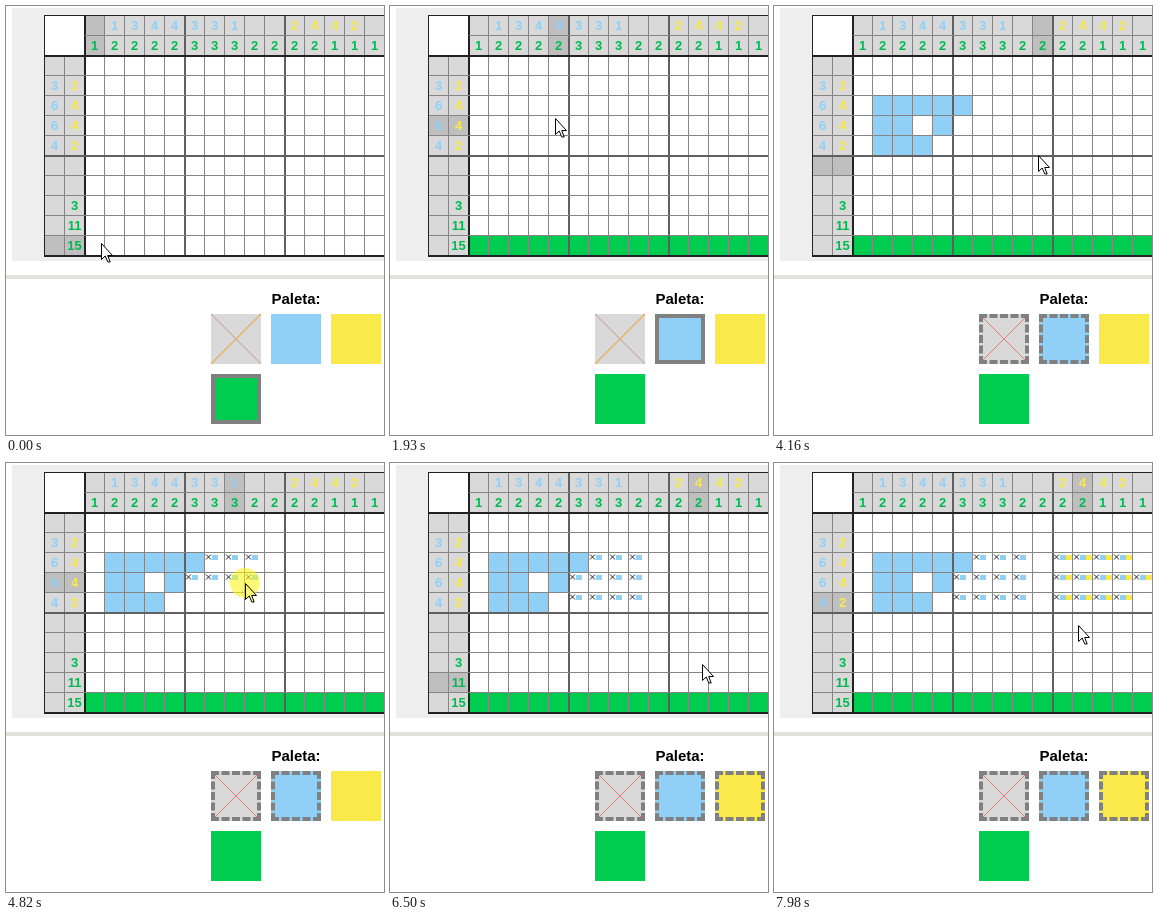
These frames come from a looping animation (378 px wide and 429 px high, 8 s). An HTML page with a canvas:

```html
<!DOCTYPE html>
<html lang="es">
<head>
<meta charset="utf-8">
<title>Nonograma</title>
<style>
  html, body { margin: 0; width: 100%; height: 100%; overflow: hidden; background: #fff; }
  canvas { display: block; width: 378px; height: 429px; }
</style>
</head>
<body>
<canvas id="stage" width="378" height="429"></canvas>
<script>
const ctx = document.getElementById('stage').getContext('2d');
const LOOP = 8000, LEFT = 79, TOP = 50, CELL = 20, COLS = 15, ROWS = 10;
const HOVER_LAG = 60;
const BLUE = '#90d0f7', YELLOW = '#f9e94a', GREEN = '#00cc50', CLUE_GREEN = '#00ba50';
const GREY = '#d9d9d9', DARK = '#bfbfbf';

// Clues: colour letter (b, y, g) followed by the number.
const colClues = [
  ' b1 b3 b4 b4 b3 b3 b1   y2 y4 y4 y2 '.split(' '),
  [...'122223332222111'].map(n => 'g' + n)
];
const rowClues = [
  ' b3 b6 b6 b4'.split(' '),
  ' y2 y4 y4 y2   g3 g11 g15'.split(' ')
];
const clueColours = { b: BLUE, y: YELLOW, g: CLUE_GREEN };

// Drawing strokes run at constant speed through cell centres (column, row).
function stroke(from, to, corners) {
  const points = corners.map(([col, row]) => [LEFT + 10 + col * CELL, TOP + 10 + row * CELL]);
  const reach = [0];
  points.slice(1).forEach(([x, y], i) =>
    reach.push(reach[i] + Math.hypot(x - points[i][0], y - points[i][1])));
  return points.map(([x, y], i) => [from + (to - from) * reach[i] / reach.at(-1), x, y]);
}

const blueStroke = stroke(2180, 2940,
  [[1, 2], [1, 4], [3, 4], [4, 3], [4, 2], [5, 2], [1, 2], [2, 3]]);
const crossStroke = stroke(4300, 5340,
  [[8, 2], [6, 2], [5, 3], [8, 3], [8, 4], [5, 4], [6, 3]]);
const yellowStroke = stroke(6690, 7560,
  [[10, 2], [10, 4], [11, 4], [11, 2], [12, 2], [12, 4], [13, 4], [13, 2], [13, 3], [14, 3]]);

// Other pointer moves: time, then x and y of the tip.
const travel = [
  [0, 95, 237], [50, 95, 237], [920, 370, 237], [960, 370, 237],
  [1350, 290, 330], [1510, 288, 328], [1720, 243, 210], [1850, 176, 130], [1930, 165, 112],
  [3000, 132, 115], [3060, 132, 117], [3720, 246, 331], [3920, 246, 331],
  [4060, 263, 178], [4160, 264, 149],
  [5410, 214, 118], [5500, 214, 118], [5700, 250, 180], [6000, 345, 332], [6190, 345, 332],
  [6320, 342, 310], [6420, 317, 235], [6500, 312, 201],
  [7620, 366, 120], [7880, 320, 135], [LOOP, 301, 167]
];
const path = [...travel, ...blueStroke, ...crossStroke, ...yellowStroke]
  .sort((a, b) => a[0] - b[0]);

const presses = [
  { from: 50, to: 950, brush: [GREEN] },
  { from: 1400, to: 1490 },
  { from: 2180, to: 3050, brush: [BLUE] },
  { from: 3885, to: 3930 },
  { from: 4300, to: 5470, brush: ['x', BLUE] },
  { from: 6090, to: 6170 },
  { from: 6690, to: 7600, brush: ['x', BLUE, YELLOW] }
];

function pointerAt(t) {
  const i = Math.max(1, path.findIndex(p => p[0] >= t));
  const [t0, x0, y0] = path[i - 1], [t1, x1, y1] = path[i];
  const k = (t - t0) / (t1 - t0);
  return { x: x0 + (x1 - x0) * k, y: y0 + (y1 - y0) * k };
}

function cellAt({ x, y }) {
  const col = Math.floor((x - LEFT) / CELL), row = Math.floor((y - TOP) / CELL);
  return col >= 0 && col < COLS && row >= 0 && row < ROWS ? { col, row } : null;
}

// Every cell keeps the first brush that passes over it.
const cells = new Map();
for (const { from, to, brush } of presses) {
  if (!brush) continue;
  for (let t = from; t < to; t += 20) {
    const cell = cellAt(pointerAt(t));
    if (!cell) continue;
    const key = cell.col + ',' + cell.row;
    if (!cells.has(key)) cells.set(key, { ...cell, t, brush });
  }
}

function rect(colour, x, y, w, h) {
  ctx.fillStyle = colour;
  ctx.fillRect(x, y, w, h);
}

function line(colour, width, x0, y0, x1, y1) {
  ctx.strokeStyle = colour;
  ctx.lineWidth = width;
  ctx.beginPath();
  ctx.moveTo(x0, y0);
  ctx.lineTo(x1, y1);
  ctx.stroke();
}

function cross(x, y, size, falling, rising, width) {
  line(falling, width, x, y, x + size, y + size);
  line(rising, width, x + size, y, x, y + size);
}

function drawClue(clue, x, y) {
  if (!clue) return;
  ctx.fillStyle = clueColours[clue[0]];
  ctx.fillText(clue.slice(1), x, y);
}

function drawCells(t) {
  for (const cell of cells.values()) {
    if (cell.t > t) continue;
    const x = LEFT + cell.col * CELL, y = TOP + cell.row * CELL;
    if (cell.brush.length === 1) {
      rect(cell.brush[0], x, y, CELL, CELL);
      continue;
    }
    cell.brush.forEach((part, i) => {
      if (part === 'x') cross(x + 1, y + 1.5, 5, '#222', '#222', 1);
      else rect(part, x + 1 + i * 6, y + 2, 6, 5);
    });
  }
}

function drawLines() {
  const thin = '#858585', thick = '#606060', edge = '#222';
  for (let k = -1; k <= COLS; k++) {
    const x = LEFT - 1 + k * CELL, bold = k % 5 === 0;
    const y = k < 0 ? TOP : 10;
    rect(k === 0 ? edge : bold ? thick : thin, x, y, bold ? 2 : 1, 250 - y);
  }
  for (let k = -1; k <= ROWS; k++) {
    const y = TOP - 1 + k * CELL, bold = k % 5 === 0;
    const x = k < 0 ? LEFT : 39;
    rect(k === 0 || k === ROWS ? edge : bold ? thick : thin, x, y, 378 - x, bold ? 2 : 1);
  }
  rect(edge, 38, 9, 340, 1);
  rect(edge, 38, 9, 1, 242);
}

function drawBoard(t) {
  rect('#eee', 6, 2, 372, 253);
  rect('#fff', 38, 9, 340, 242);
  rect(GREY, LEFT, 10, 299, 40);
  rect(GREY, 39, TOP, 40, 200);
  const hover = cellAt(pointerAt(Math.max(0, t - HOVER_LAG)));
  if (hover) {
    rect(DARK, LEFT + hover.col * CELL, 10, CELL, 40);
    rect(DARK, 39, TOP + hover.row * CELL, 40, CELL);
  }
  drawCells(t);
  drawLines();
  ctx.font = 'bold 13px "Liberation Sans", Arial, sans-serif';
  ctx.textAlign = 'center';
  colClues.forEach((list, j) =>
    list.forEach((clue, i) => drawClue(clue, 88.5 + i * CELL, 24 + j * CELL)));
  rowClues.forEach((list, i) =>
    list.forEach((clue, j) => drawClue(clue, 48.5 + i * CELL, 64 + j * CELL)));
}

function drawSwatch(colour, x, y, border) {
  rect(colour, x, y, 50, 50);
  if (colour === GREY) {
    if (border) cross(x + 4, y + 4, 42, '#f27c78', '#f27c78', 1);
    else cross(x, y, 50, '#cbb1ad', '#e7b05e', 1.3);
  }
  if (!border) return;
  ctx.setLineDash(border === 'dashed' ? [8, 2.5] : []);
  for (const d of [2, 48]) {
    line('#808080', 4, x, y + d, x + 50, y + d);
    line('#808080', 4, x + d, y, x + d, y + 50);
  }
  ctx.setLineDash([]);
}

function drawPalette(t) {
  rect('#e2e2da', 0, 269, 378, 4);
  ctx.fillStyle = '#000';
  ctx.font = 'bold 15px "Liberation Sans", Arial, sans-serif';
  ctx.fillText('Paleta:', 290, 298);
  const marking = t >= 3890 && 'dashed';
  drawSwatch(GREY, 205, 308, marking);
  drawSwatch(BLUE, 265, 308, marking || (t >= 1400 && 'solid'));
  drawSwatch(YELLOW, 325, 308, t >= 6100 && 'dashed');
  drawSwatch(GREEN, 205, 368, t < 1400 && 'solid');
}

const arrow = new Path2D('M.5 .5V16.5L4.2 13L6.8 19H9.2L6.7 12.5H11.5Z');

function drawPointer(t) {
  const { x, y } = pointerAt(t);
  const pressed = presses.some(p => t >= p.from && t < p.to);
  if (pressed) {
    ctx.fillStyle = 'rgba(250, 245, 20, .58)';
    ctx.beginPath();
    ctx.arc(x, y, 15, 0, Math.PI * 2);
    ctx.fill();
  }
  ctx.save();
  ctx.translate(Math.round(x), Math.round(y));
  ctx.fillStyle = pressed ? '#fbf780' : '#fff';
  ctx.strokeStyle = '#000';
  ctx.lineWidth = 1;
  ctx.fill(arrow);
  ctx.stroke(arrow);
  ctx.restore();
}

function draw(t) {
  rect('#fff', 0, 0, 378, 429);
  drawBoard(t);
  drawPalette(t);
  drawPointer(t);
}

let start;
function tick(now) {
  start ??= now;
  draw((now - start) % LOOP);
  requestAnimationFrame(tick);
}
draw(0);
requestAnimationFrame(tick);
</script>
</body>
</html>
```
